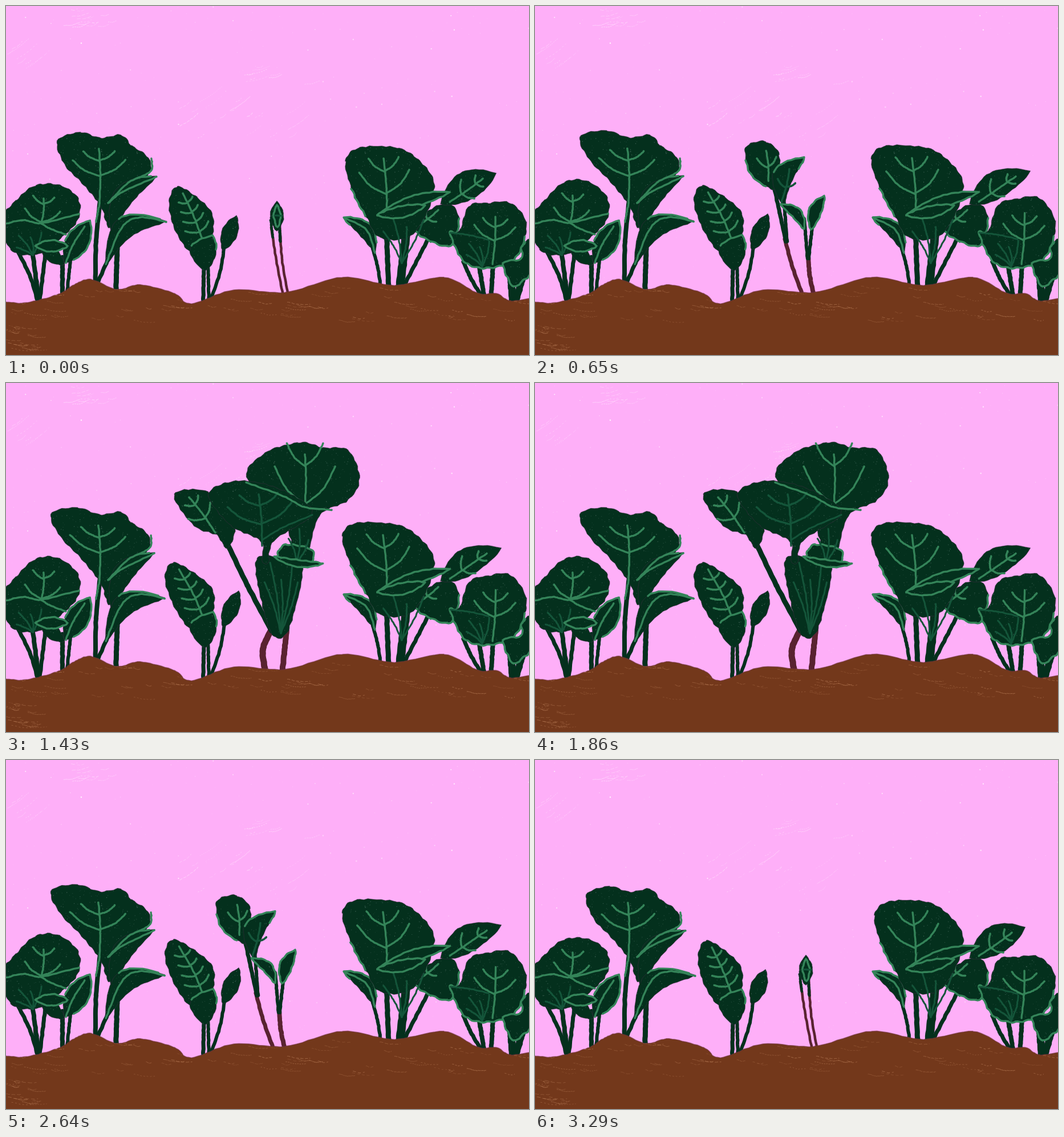
Write an HTML page with a canvas that moves like this. It is 917 by 611 pixels and loops after 3.42 s.

```html
<!DOCTYPE html>
<html lang="en">
<head>
<meta charset="utf-8">
<title>Growing leaves</title>
<style>
html, body { margin: 0; width: 100%; height: 100%; overflow: hidden; background: #feaff8; }
canvas { display: block; }
</style>
</head>
<body>
<canvas id="stage" width="917" height="611"></canvas>
<script>
const W = 917, H = 611, STEP = 130, LOOP = 3420, TURN = 1860;
const SKY = '#feaff8', SOIL = '#73381b', DARK = '#04301d';
const GREEN = '#348459', DIM = '#14553a', ROOT = '#592330';
let ctx = document.getElementById('stage').getContext('2d');
let sway = 0;

// Leaf tips pulled by the breeze: x, y, dx, dy
const BREEZE = [
  [92, 236, -11, -6], [75, 313, 0, -7], [290, 330, -8, -2], [408, 370, 4, -3],
  [602, 262, -6, -4], [857, 291, 9, -1], [865, 343, 0, -9]
];

function rng(seed) {
  return () => {
    seed = (seed * 1664525 + 1013904223) >>> 0;
    return seed / 4294967296;
  };
}

function bend([x, y]) {
  let nx = x, ny = y;
  if (sway) for (const [ax, ay, dx, dy] of BREEZE) {
    const k = sway * Math.exp(-((x - ax) ** 2 + (y - ay) ** 2) / 2200);
    nx += dx * k;
    ny += dy * k;
  }
  return [nx, ny];
}

// Catmull-Rom samples through a flat list of key points
function spline(flat, closed) {
  const n = flat.length / 2, out = [];
  const at = i => {
    const j = closed ? (i + n) % n : Math.max(0, Math.min(n - 1, i));
    return [flat[2 * j], flat[2 * j + 1]];
  };
  for (let i = 0; i < (closed ? n : n - 1); i++) {
    const [a, b, c, d] = [at(i - 1), at(i), at(i + 1), at(i + 2)];
    for (let t = 0; t < 1; t += 0.1) {
      out.push([0, 1].map(k => b[k] + 0.5 * t * (c[k] - a[k] +
        t * (2 * a[k] - 5 * b[k] + 4 * c[k] - d[k] + t * (3 * b[k] - a[k] - 3 * c[k] + d[k])))));
    }
  }
  if (!closed) out.push(at(n - 1));
  return out;
}

// Wavy, slightly shaky edge
function ruffle(pts, amp) {
  const rand = rng(pts.length);
  let arc = 0;
  return pts.map(([x, y], i) => {
    const [px, py] = pts[Math.max(0, i - 1)], [qx, qy] = pts[Math.min(pts.length - 1, i + 1)];
    const len = Math.hypot(qx - px, qy - py) || 1;
    arc += len / 2;
    const k = amp * Math.sin(arc / 2.9) + (rand() - 0.5) * 0.8;
    return bend([x + (qy - py) / len * k, y - (qx - px) / len * k]);
  });
}

function trace(pts) {
  const path = new Path2D();
  pts.forEach(p => path.lineTo(...p));
  return path;
}

function ink(pts, color = GREEN, width = 3.4) {
  ctx.strokeStyle = color;
  ctx.lineWidth = width;
  ctx.stroke(trace(pts));
}
const line = (flat, color, width) => ink(ruffle(spline(flat, false), 0.2), color, width);

function grain(seed, size, count, color) {
  const c = document.createElement('canvas'), g = c.getContext('2d'), rand = rng(seed);
  c.width = c.height = size;
  g.fillStyle = color;
  for (let i = 0; i < count; i++) {
    g.globalAlpha = 0.1 + rand() * 0.5;
    g.fillRect(rand() * size, rand() * size, 0.6 + rand(), 0.6 + rand());
  }
  return ctx.createPattern(c, 'repeat');
}
const leafGrain = grain(5, 200, 520, '#6d8a80');

// lit: stretch of the outline drawn in light green
function fillLeaf(pts, lit) {
  const path = trace(pts);
  path.closePath();
  for (const paint of [DARK, leafGrain]) {
    ctx.fillStyle = paint;
    ctx.fill(path);
  }
  ctx.strokeStyle = 'rgba(60,45,65,.55)';
  ctx.lineWidth = 1;
  ctx.stroke(path);
  if (lit) ink(pts.slice(lit[0] * pts.length, lit[1] * pts.length));
}

const shape = (flat, lit) => fillLeaf(ruffle(spline(flat, true), 0.9), lit);

// Pointed leaf from base to tip, bowed sideways
function blade(x0, y0, x1, y1, width, bow = 0, lit) {
  const dx = x1 - x0, dy = y1 - y0, len = Math.hypot(dx, dy), n = 20, pts = [];
  for (let i = 0; i <= 2 * n; i++) {
    const u = 1 - Math.abs(i / n - 1), side = i < n ? 1 : -1;
    const off = bow * Math.sin(Math.PI * u) + side * width * Math.sin(Math.PI * u) ** 0.8;
    pts.push([x0 + dx * u + dy / len * off, y0 + dy * u - dx / len * off]);
  }
  fillLeaf(ruffle(pts, 0.5), lit);
}

function stem(x0, y0, x1, y1, width = 7, color = DARK, bow = 0) {
  line([x0, y0, (x0 + x1) / 2 + bow, (y0 + y1) / 2, x1, y1], color, width);
}

// Spine with pairs of curved side veins that shorten towards the tip
function ribs(x0, y0, x1, y1, pairs, span, from = 0.45, lean = 0.7, color = GREEN) {
  const dx = x1 - x0, dy = y1 - y0, len = Math.hypot(dx, dy), ux = dx / len, uy = dy / len;
  line([x0, y0, x0 + dx / 2 + 2, y0 + dy / 2, x1, y1], color);
  for (let i = 0; i < pairs; i++) {
    const k = pairs > 1 ? i / (pairs - 1) : 0, t = from + (0.78 - from) * k, s = span * (1 - 0.4 * k);
    const x = x0 + dx * t, y = y0 + dy * t;
    for (const side of [-1, 1]) {
      const go = (a, b) => [x - uy * side * s * a + ux * s * b, y + ux * side * s * a + uy * s * b];
      line([x, y, ...go(0.6, lean * 0.4), ...go(1, lean)], color);
    }
  }
}

// Dim veins spreading from a point
function fan(x, y, count, a0, a1, len) {
  for (let i = 0; i < count; i++) {
    const a = a0 + (a1 - a0) * i / (count - 1), r = len * (i % 2 ? 1 : 0.75);
    stem(x + Math.cos(a) * r, y + Math.sin(a) * r, x, y, 3, DIM, 3);
  }
}

function bush() {
  stem(22, 432, 56, 518, 7, DARK, 4);
  stem(46, 428, 58, 518, 8);
  stem(70, 425, 59, 518);
  shape([-8, 375, 18, 340, 52, 314, 95, 314, 127, 338, 124, 378, 82, 418, 50, 436, 8, 426]);
  fan(47, 436, 4, -2.7, -1.2, 42);
  line([-8, 383, 30, 375, 62, 380, 128, 364]);
  ribs(62, 381, 66, 337, 2, 31, 0.05);
  line([62, 381, 78, 390, 105, 400]);
  stem(99, 440, 99, 503, 8);
  stem(114, 435, 107, 503, 6);
  blade(102, 453, 60, 420, 12);
  blade(103, 450, 147, 376, 20, 0, [0.2, 0.95]);
  stem(138, 386, 105, 450, 3.4, GREEN, -4);
  blade(108, 420, 52, 420, 10, 0, [0, 1]);
}

function tallLeft() {
  stem(165, 340, 157, 484, 8, DARK, -3);
  stem(198, 400, 162, 482);
  stem(195, 420, 193, 496, 9);
  shape([90, 236, 131, 221, 165, 231, 202, 226, 220, 244, 248, 264, 252, 292, 212, 345, 182, 388, 166, 350, 133, 310, 103, 278]);
  blade(184, 395, 264, 298, 18, 22, [0.4, 0.5]);
  blade(175, 453, 281, 377, 19, 33, [0.25, 0.5]);
  line([255, 267, 253, 290, 215, 309, 179, 345]);
  line([181, 344, 205, 325, 264, 299]);
  line([175, 452, 203, 388, 235, 370, 281, 378]);
  ribs(164, 345, 163, 250, 2, 46, 0.5, 0.6);
  stem(164, 345, 158, 378, 3.4, GREEN);
}

function middle() {
  stem(347, 445, 346, 518);
  stem(354, 448, 356, 518, 6);
  stem(383, 418, 360, 512, 6, DARK, 4);
  shape([300, 316, 335, 335, 362, 365, 361, 406, 345, 428, 322, 430, 296, 392, 286, 345]);
  ribs(343, 405, 310, 328, 4, 22, 0.12, 0.5);
  blade(348, 464, 362, 402, 23, 10, [0.3, 0.7]);
  blade(380, 428, 404, 367, 14);
}

function tallRight() {
  stem(643, 425, 657, 492, 6, DARK, 2);
  stem(667, 395, 671, 492, 9);
  stem(702, 395, 691, 490, 15);
  stem(743, 402, 701, 484);
  blade(648, 432, 592, 370, 13, -13, [0.4, 0.95]);
  line([593, 371, 632, 392, 647, 432]);
  shape([716, 390, 735, 362, 775, 345, 794, 372, 782, 418, 745, 412], [0.5, 1]);
  ribs(722, 385, 758, 357, 1, 14);
  blade(762, 347, 859, 293, 25, 6);
  ribs(778, 343, 836, 302, 2, 20, 0.35);
  shape([595, 272, 620, 248, 685, 248, 722, 268, 748, 300, 750, 326, 738, 362, 706, 405, 655, 405, 633, 372, 608, 325], [0.83, 0.93]);
  fan(694, 450, 4, -2.1, -1.1, 85);
  ribs(668, 370, 662, 267, 2, 44, 0.4, 0.9);
  blade(651, 367, 778, 326, 10, 4, [0, 1]);
  blade(651, 366, 735, 349, 10, -3, [0, 1]);
}

function farRight() {
  stem(802, 448, 832, 505, 7, DARK, -2);
  stem(829, 452, 838, 505, 8);
  stem(854, 450, 851, 505, 8);
  shape([795, 394, 812, 350, 845, 345, 885, 345, 912, 378, 905, 420, 886, 447, 842, 459, 803, 447, 779, 398], [0.46, 0.98]);
  fan(835, 456, 4, -2.5, -1.3, 46);
  line([779, 397, 812, 401, 846, 409], DIM, 3);
  ribs(853, 452, 858, 369, 2, 36, 0.5);
  stem(884, 460, 889, 520, 13);
  stem(910, 460, 893, 520, 12);
  shape([925, 408, 905, 420, 903, 443, 872, 450, 888, 490, 905, 482, 925, 460], [0.1, 0.85]);
}

function sprout() {
  stem(465, 388, 485, 502, 4.5, ROOT, -1);
  stem(480, 385, 494, 502, 4.5, ROOT, -3);
  stem(464, 375, 468, 405, 4.5);
  stem(479, 378, 481, 412, 5);
  blade(475, 394, 475, 342, 12);
  blade(476, 387, 475, 349, 6, 0, [0, 1]);
  stem(471, 367, 484, 367, 3, DIM);
}

function seedling() {
  stem(438, 408, 467, 500, 7, ROOT, -2);
  stem(479, 438, 488, 502, 8, ROOT, -2);
  stem(418, 312, 440, 412);
  stem(436, 335, 442, 412, 6);
  stem(472, 372, 478, 442, 6);
  stem(487, 378, 480, 442, 6);
  shape([368, 255, 376, 241, 405, 237, 428, 260, 424, 315, 410, 318, 378, 294], [0.75, 0.95]);
  ribs(409, 306, 405, 253, 1, 17, 0.45, 1);
  blade(434, 348, 472, 264, 18, 20, [0.25, 0.65]);
  ribs(432, 343, 446, 285, 1, 16, 0.45, 0.7, DIM);
  blade(472, 390, 431, 347, 9, -9, [0, 1]);
  blade(484, 391, 507, 332, 11, 5, [0, 1]);
}

function young() {
  stem(446, 410, 459, 500, 8, ROOT, -6);
  stem(490, 425, 487, 502, 8, ROOT);
  stem(378, 294, 444, 408);
  shape([297, 250, 325, 226, 366, 218, 396, 247, 394, 290, 382, 303, 332, 290], [0.5, 0.75]);
  ribs(382, 303, 339, 235, 2, 24);
  ctx.save();
  ctx.translate(390, -88);
  ctx.beginPath();
  ctx.rect(-20, 290, 200, 228);
  ctx.clip();
  bush();
  ctx.restore();
  line([446, 418, 445, 450, 459, 500], ROOT, 9);
  line([490, 432, 488, 465, 487, 502], ROOT, 9);
}

function grown() {
  stem(465, 432, 454, 500, 11, ROOT, -9);
  stem(492, 432, 485, 502, 10, ROOT);
  stem(385, 275, 466, 434, 9, DARK, -2);
  shape([295, 195, 355, 191, 400, 245, 392, 286, 382, 285, 369, 266, 330, 250]);
  ribs(367, 262, 321, 200, 2, 24, 0.4);
  shape([422, 165, 455, 122, 495, 108, 525, 104, 555, 113, 600, 118, 620, 167, 600, 205, 550, 232, 527, 305, 508, 308, 488, 245]);
  ribs(524, 217, 524, 125, 2, 53, 0.05, 1.25);
  shape([440, 308, 474, 304, 519, 320, 506, 398, 489, 442, 465, 437, 443, 360]);
  fan(482, 438, 5, -1.88, -1.25, 125);
  shape([355, 198, 385, 175, 435, 173, 500, 195, 537, 230, 470, 276, 460, 315, 449, 310, 447, 277, 395, 250]);
  ribs(449, 285, 443, 195, 2, 56, 0.42, 0.6, DIM);
  line([449, 275, 485, 253, 537, 231], DIM, 3);
  line([421, 174, 486, 198, 523, 217, 571, 222]);
  shape([477, 301, 491, 283, 536, 292, 533, 318, 500, 320], [0, 0.7]);
  fan(510, 315, 3, -1.9, -1.1, 60);
  blade(470, 304, 556, 316, 6, -6, [0, 1]);
}

// Each drawing covers a run of steps and swells from one size to the next
const STAGES = [
  { draw: sprout, first: 0, last: 2, from: 1, to: 1.35 },
  { draw: seedling, first: 3, last: 6, from: 0.74, to: 1.03 },
  { draw: young, first: 7, last: 9, from: 0.86, to: 1 },
  { draw: grown, first: 10, last: 12, from: 0.82, to: 1.06 }
];

function paintPlant(k) {
  const { draw, first, last, from, to } = STAGES.find(s => k <= s.last);
  const u = (k - first) / (last - first), size = from + (to - from) * u * (2 - u);
  ctx.translate(476, 499);
  ctx.scale(size, size);
  ctx.translate(-476, -499);
  draw();
}

// Chalky dashes scattered over a box
function streaks(seed, count, x, y, w, h, rise, color) {
  const rand = rng(seed);
  for (let i = 0; i < count; i++) {
    const sx = x + rand() * w, sy = y + rand() * h, len = 8 + rand() * 32;
    ctx.setLineDash([1 + rand() * 6, 1 + rand() * 4]);
    line([sx, sy, sx + len / 2, sy + len * rise / 2 + 2, sx + len, sy + len * rise], color, 0.4 + rand() * 0.7);
  }
  ctx.setLineDash([]);
}

function paintSky() {
  const rand = rng(23);
  ctx.fillStyle = SKY;
  ctx.fillRect(0, 0, W, H);
  ctx.fillStyle = '#fff';
  for (let i = 0; i < 340; i++) {
    const size = 0.6 + rand() ** 6 * 2;
    ctx.globalAlpha = 0.25 + rand() * 0.55;
    ctx.fillRect(rand() * W, rand() * 500, size, size);
  }
  ctx.globalAlpha = 0.6;
  streaks(7, 14, 75, 5, 110, 32, -0.2, '#ffe6fd');
  streaks(8, 8, 0, 75, 45, 35, -0.75, '#ffe6fd');
  streaks(9, 18, 290, 160, 210, 80, -0.7, '#ffdffc');
  streaks(10, 9, 380, 105, 220, 40, -0.25, '#ffdffc');
  ctx.globalAlpha = 1;
}

function paintGround() {
  const pts = ruffle(spline([-10, 516, 25, 520, 60, 514, 95, 503, 125, 485, 150, 479, 195, 496, 235, 488, 295, 503, 325, 521,
    400, 497, 490, 501, 590, 475, 680, 489, 768, 475, 828, 503, 860, 503, 885, 516, 930, 510], false), 0.2);
  const path = trace(pts);
  path.lineTo(930, 620);
  path.lineTo(-10, 620);
  ctx.fillStyle = SOIL;
  ctx.fill(path);
  ink(pts, 'rgba(110,50,60,.6)', 1.5);
  ctx.clip(path);
  streaks(41, 80, -10, 490, 930, 60, 0.1, 'rgba(205,145,105,.42)');
  streaks(42, 18, -10, 555, 60, 50, 0.1, 'rgba(205,145,105,.45)');
}

function layer(paint) {
  const c = document.createElement('canvas'), main = ctx;
  c.width = W;
  c.height = H;
  ctx = c.getContext('2d');
  ctx.lineCap = ctx.lineJoin = 'round';
  paint();
  ctx = main;
  return c;
}

const sky = layer(paintSky), ground = layer(paintGround);
const sides = [0, 1, 2].map(s => layer(() => {
  sway = s;
  [bush, tallLeft, middle, tallRight, farRight].forEach(draw => draw());
  sway = 0;
}));
const plants = Array.from({ length: 13 }, (_, k) => layer(() => paintPlant(k)));

// Steps up, rests at full height, then steps back down
function tick(now) {
  const t = now % LOOP;
  const k = t < TURN ? Math.min(12, Math.floor(t / STEP)) : Math.max(0, 11 - Math.floor((t - TURN) / STEP));
  const side = sides[1 - Math.round(Math.cos(k * Math.PI / 2))];
  for (const c of [sky, side, plants[k], ground]) ctx.drawImage(c, 0, 0);
  requestAnimationFrame(tick);
}
requestAnimationFrame(tick);
</script>
</body>
</html>
```
